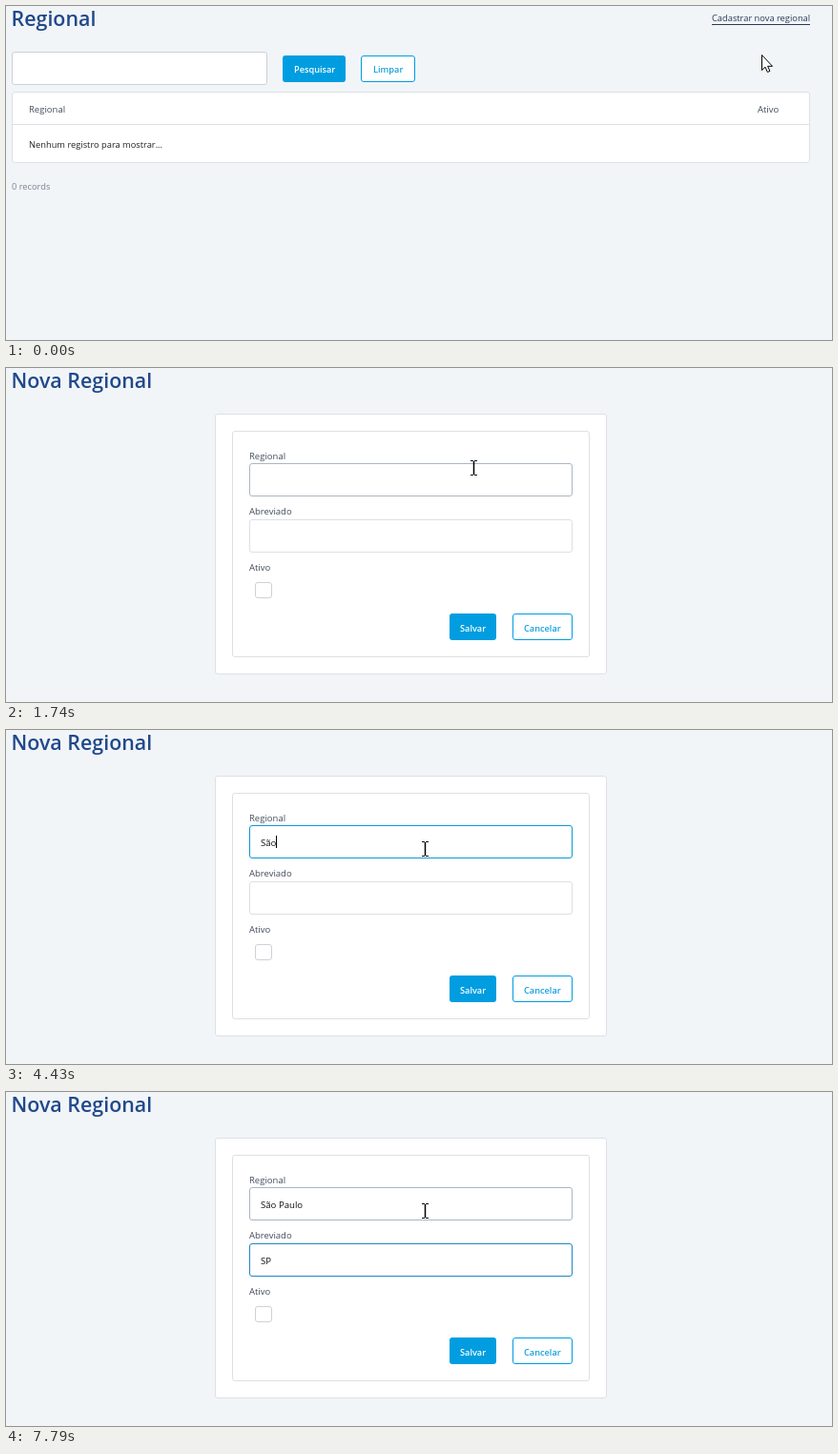
Recreate the animation shown at these times as an HTML page. Size 866 by 351 pixels, loop 8000 ms.

```html
<!DOCTYPE html>
<html lang="pt-BR">
<head>
<meta charset="utf-8">
<title>Cadastro de regional</title>
<style>
  html, body { margin: 0; width: 100%; height: 100%; overflow: hidden; background: #f1f5f8; }
  svg { display: block; }
  text { font: 9.3px "Open Sans", "Noto Sans", sans-serif; fill: #434c5c; white-space: pre; }
  .title { font-size: 21.4px; font-weight: 600; fill: #21498a; }
  .button { font-size: 9.2px; font-weight: 600; fill: #fff; }
  .button.blue { fill: #149fdb; }
  .label { font-size: 9.5px; }
  .value { font-size: 9.6px; fill: #111; }
  .muted { fill: #7d8291; }
  .panel { fill: #fff; stroke: #dde1e5; }
  .input { fill: #fff; stroke: #cdd1d6; }
  .solid { fill: #009de0; }
  .outline { fill: #fff; stroke: #009de0; }
</style>
</head>
<body>
<svg width="866" height="351" viewBox="0 0 866 351">
  <g id="list">
    <text class="title" x="5.5" y="21">Regional</text>
    <text id="link" x="740" y="16"><tspan>Cadastrar</tspan><tspan> nova regional</tspan></text>
    <path id="lineA" d="M740 19.5h45"/>
    <path id="lineB" d="M785 19.5h58"/>
    <rect class="input" x="6.5" y="48.5" width="267" height="34" rx="2.5"/>
    <rect class="solid" x="290" y="52" width="66" height="28" rx="3"/>
    <text class="button" x="302" y="70">Pesquisar</text>
    <rect class="outline" x="372.5" y="52.5" width="56" height="27" rx="2.5"/>
    <text class="button blue" x="385" y="70">Limpar</text>
    <rect class="panel" x="6.5" y="90.5" width="836" height="74" rx="2.5"/>
    <path class="panel" d="M7 124.5h835"/>
    <text class="label" x="24" y="112">Regional</text>
    <text class="label" x="788" y="112">Ativo</text>
    <text x="24" y="149" style="fill:#222">Nenhum registro para mostrar...</text>
    <text class="muted" x="6" y="193">0 records</text>
  </g>

  <g id="form">
    <text class="title" x="5.5" y="21">Nova Regional</text>
    <rect class="panel" x="219.5" y="48.5" width="410" height="273" rx="2.5"/>
    <rect class="panel" x="237.5" y="66.5" width="374" height="237" rx="2.5"/>
    <text class="label" x="255" y="96">Regional</text>
    <rect class="input" id="nameBox" x="255.5" y="100.5" width="338" height="34" rx="2.5"/>
    <text class="value" id="name" x="267" y="122"></text>
    <text class="label" x="255" y="154">Abreviado</text>
    <rect class="input" id="shortBox" x="255.5" y="159.5" width="338" height="34" rx="2.5"/>
    <text class="value" id="short" x="267" y="181"></text>
    <rect id="caret" width="1" height="13" fill="#000"/>
    <text class="label" x="255" y="213">Ativo</text>
    <rect class="input" x="261.5" y="225.5" width="17" height="16" rx="2.5"/>
    <rect class="solid" x="465" y="258" width="49" height="28" rx="3"/>
    <text class="button" x="476" y="277">Salvar</text>
    <rect class="outline" x="531.5" y="258.5" width="62" height="27" rx="2.5"/>
    <text class="button blue" x="543" y="277">Cancelar</text>
  </g>

  <circle id="click" r="12" fill="#ff0" fill-opacity=".47"/>
  <path id="arrow" d="M.5.5V16.5L4 13.2 6.4 18.5 8.9 17.4 6.6 12.3H11.5Z" fill="#fff" stroke="#000"/>
  <g id="beam" fill="none" stroke="#000">
    <path d="M-3-7.5h3m1 0h3M-3 7.5h3m1 0h3"/>
    <path d="M.5-7V7" stroke-width="1.5"/>
  </g>
</svg>
<script>
const LOOP = 8000;
const FORM_OPENS = 1190, NAME_FOCUS = 2210, SHORT_FOCUS = 6150;
const $ = id => document.getElementById(id);
const show = (id, on) => { $(id).style.display = on ? '' : 'none'; };

// [time, value] pairs: the last one already reached holds
const at = (track, t) => track.reduce((held, [time, value]) => t >= time ? value : held, track[0][1]);

const nameText = [[0, ''], [2960, 'S'], [4360, 'Sã'], [4430, 'São'], [4670, 'São '], [4840, 'São P'],
  [5160, 'São Pa'], [5310, 'São Pau'], [5540, 'São Paul'], [5770, 'São Paulo']];
const shortText = [[0, ''], [7250, 'S'], [7320, 'SP']];
const caretOn = [[0, false], [2210, true], [2730, false], [2960, true], [3280, false], [3740, true],
  [4290, false], [4360, true], [5920, false], [6150, true], [6700, false], [7180, true], [7790, false]];
const nameBorder = [[0, '#cdd1d6'], [1730, '#adb6c2'], [2210, '#7fb0d0'], [2270, '#4aa3d2'],
  [2350, '#0d99d6'], [6150, '#4aa3d2'], [6230, '#86acc6'], [6300, '#a9b4c2']];
const shortBorder = [[0, '#cdd1d6'], [1500, '#dde0e4'], [6150, '#a9c4d8'], [6230, '#6aa9d0'],
  [6300, '#3d92c6'], [6380, '#2286c2']];

// Pointer travel in equal hops; the first hop lands at start, the last at end
const moves = [
  { start: 90, end: 560, hops: 7, from: [792, 51], to: [777, 13] },
  { start: 1340, end: 1890, hops: 8, from: [777, 13], to: [437, 122] },
  { start: 2580, end: 2580, hops: 1, from: [437, 122], to: [439, 125] }
];
const smooth = p => p * p * (3 - 2 * p);

function pointer(t) {
  let place = moves[0].from;
  for (const { start, end, hops, from, to } of moves) {
    if (t < start) break;
    const gap = (end - start) / Math.max(1, hops - 1);
    const done = t >= end ? hops : 1 + Math.floor((t - start) / gap);
    const p = smooth(done / hops);
    place = from.map((v, i) => Math.round(v + (to[i] - v) * p));
  }
  return place;
}

function drawLink(hover) {
  const [left, right] = hover ? ['#3c84cb', '#7a69bd'] : ['#2c3a56', '#2c3a56'];
  const [a, b] = $('link').children;
  a.style.fill = left;
  b.style.fill = right;
  $('lineA').style.stroke = left;
  $('lineB').style.stroke = right;
}

function drawFields(t) {
  $('name').textContent = at(nameText, t);
  $('short').textContent = at(shortText, t);
  $('nameBox').style.stroke = at(nameBorder, t);
  $('shortBox').style.stroke = at(shortBorder, t);
  const inShort = t >= SHORT_FOCUS;
  const width = $(inShort ? 'short' : 'name').getComputedTextLength();
  $('caret').setAttribute('x', 267 + Math.round(width));
  $('caret').setAttribute('y', inShort ? 170 : 111);
  show('caret', at(caretOn, t));
}

function draw(t) {
  const formOpen = t >= FORM_OPENS;
  const [x, y] = pointer(t);
  const overInput = formOpen && x < 594 && y >= 100;
  show('list', !formOpen);
  show('form', formOpen);
  drawLink(y < 20);
  if (formOpen) drawFields(t);
  show('arrow', !overInput);
  show('beam', overInput);
  show('click', [730, NAME_FOCUS].some(time => t >= time && t < time + 60));
  for (const id of ['arrow', 'beam', 'click']) $(id).setAttribute('transform', `translate(${x} ${y})`);
}

const begin = performance.now();
function tick() {
  draw((performance.now() - begin) % LOOP);
  requestAnimationFrame(tick);
}
tick();
</script>
</body>
</html>
```
